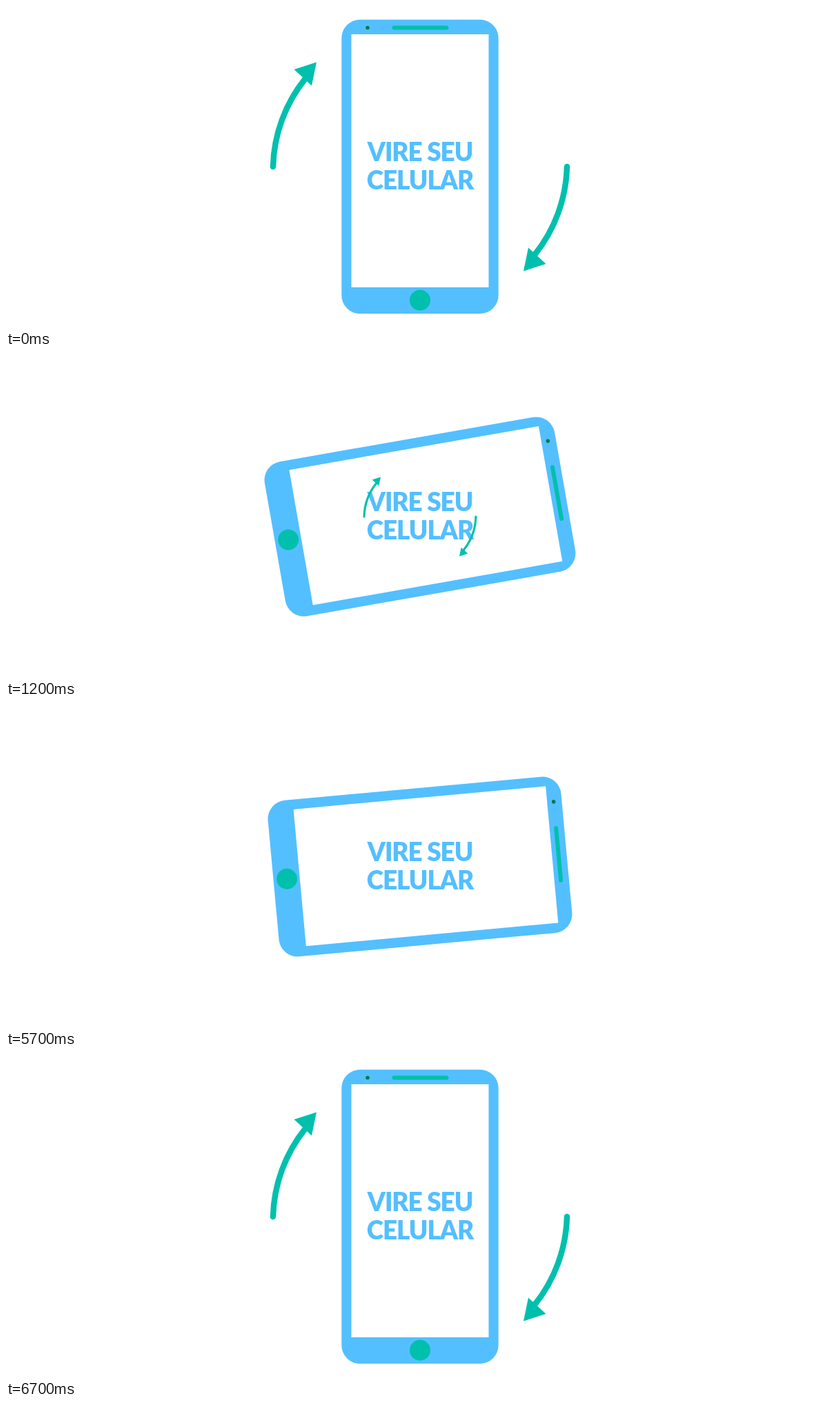
An HTML page that plays this animation: 1200x467 px, repeating every 7800 ms.

```html
<!DOCTYPE html>
<html lang="pt">
<head>
<meta charset="utf-8">
<title>Vire seu celular</title>
<style>
  html, body { margin: 0; width: 100%; height: 100%; overflow: hidden; background: #fff; }
  svg { display: block; width: 100vw; height: 100vh; }
  text { font: 900 37px Lato, sans-serif; letter-spacing: -1.1px; text-anchor: middle; fill: #54bfff; }
</style>
</head>
<body>
<svg viewBox="0 0 1200 467">
  <defs>
    <g id="arrow">
      <path d="M-213 0A213 213 0 0 1 -166 -128" fill="none" stroke="#00c0ad" stroke-width="8.5" stroke-linecap="round"/>
      <path d="M-150 -151.5L-182.5 -141L-157 -117.5Z" fill="#00c0ad"/>
    </g>
  </defs>
  <g transform="translate(600 233)">
    <g id="phone">
      <rect x="-113.7" y="-213.3" width="227.4" height="426.6" rx="27" fill="#54bfff"/>
      <rect x="-99.5" y="-192" width="199" height="367" fill="#fff"/>
      <rect x="-40.5" y="-204.5" width="82" height="6" rx="3" fill="#00c0ad"/>
      <circle cx="-76" cy="-201.5" r="2.8" fill="#08784f"/>
      <circle cx="0" cy="193.7" r="15" fill="#00c0ad"/>
    </g>
    <text y="-8">VIRE SEU</text>
    <text y="33">CELULAR</text>
    <g id="arrows">
      <use href="#arrow"/>
      <use href="#arrow" transform="rotate(180)"/>
    </g>
  </g>
</svg>
<script>
const LOOP = 7800, STEP = 100;
const phone = document.getElementById('phone');
const arrows = document.getElementById('arrows');

const ramp = (t, start, length) => Math.min(1, Math.max(0, (t - start) / length));
const smooth = x => x * x * (3 - 2 * x);
const soft = x => 0.45 * x + 0.275 * (1 - Math.cos(Math.PI * x));

function phoneAngle(t) {
  return 90 * (smooth(ramp(t, 367, 1050)) - soft(ramp(t, 5600, 1000)));
}

function arrowPose(t) {
  if (t < 200) return [0, 1];
  if (t < 2400) {
    const shrink = 1 - 0.62 * smooth(ramp(t, 150, 1000));
    const vanish = 1 - smooth(ramp(t, 1700, 700));
    return [360 * smooth(ramp(t, 450, 1500)), shrink * vanish];
  }
  if (t < 6300) return [0, 0];
  const left = 1 - ramp(t, 6300, 400);
  return [-134 * left ** 2, 1 + 0.82 * left ** 3];
}

function draw(now) {
  const t = Math.floor(now % LOOP / STEP) * STEP;
  const [angle, scale] = arrowPose(t);
  phone.setAttribute('transform', `rotate(${phoneAngle(t)})`);
  arrows.setAttribute('transform', `rotate(${angle}) scale(${scale})`);
  arrows.style.display = scale ? '' : 'none';
}

const begin = performance.now();
function tick() {
  draw(performance.now() - begin);
  requestAnimationFrame(tick);
}
tick();
</script>
</body>
</html>
```
